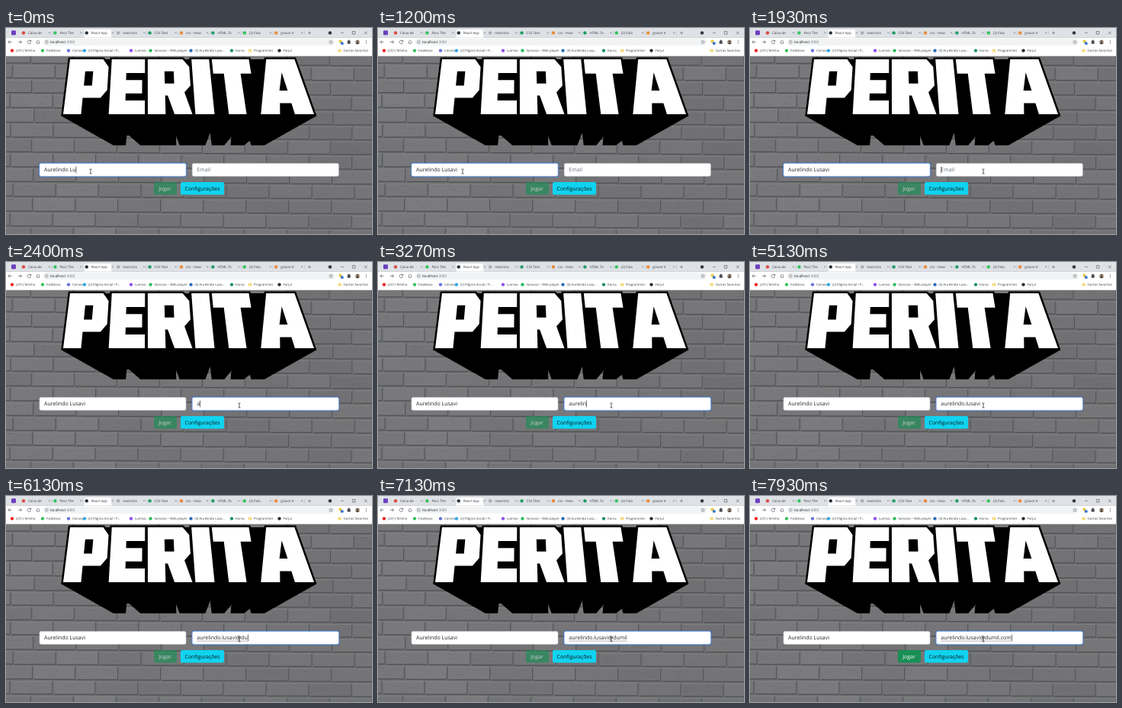
Recreate the animation shown at these times as an HTML page with a canvas. Size 480 px wide and 270 px high, loop 8 s.

```html
<!DOCTYPE html>
<html lang="pt-BR">
<head>
<meta charset="utf-8">
<title>Quiz</title>
<style>
  html, body { margin: 0; width: 100%; height: 100%; overflow: hidden; background: #757678; }
  canvas, svg { position: absolute; left: 0; top: 0; width: 480px; height: 270px; }
  text { font-family: "Open Sans", "Noto Sans", sans-serif; text-rendering: geometricPrecision; white-space: pre; }
</style>
</head>
<body>
<canvas id="wall" width="480" height="270"></canvas>
<svg id="stage" viewBox="0 0 480 270"></svg>
<script>
const LOOP = 8000;
const stage = document.getElementById('stage');

function add(tag, attrs, parent = stage) {
  const el = document.createElementNS('http://www.w3.org/2000/svg', tag);
  for (const k in attrs) el.setAttribute(k, attrs[k]);
  parent.append(el);
  return el;
}
const box = (x, y, width, height, fill, rx = 0, parent) =>
  add('rect', { x, y, width, height, fill, rx }, parent);
const dot = (cx, cy, r, fill) => add('circle', { cx, cy, r, fill });
const line = (d, stroke, width = 0.6, parent) =>
  add('path', { d, stroke, 'stroke-width': width, fill: 'none' }, parent);
function label(x, y, str, size, fill = '#3c4043', parent) {
  const el = add('text', { x, y, 'font-size': size, fill }, parent);
  el.textContent = str;
  return el;
}
const clamp = v => Math.max(0, Math.min(1, v));
const ramp = (t, start, ms) => clamp((t - start) / ms);

function drawWall() {
  const c = document.getElementById('wall').getContext('2d');
  let seed = 11;
  const rnd = () => (seed = seed * 16807 % 2147483647) / 2147483647;
  const fill = (color, x, y, w, h) => { c.fillStyle = color; c.fillRect(x, y, w, h); };
  fill('#707173', 0, 0, 480, 270);
  const rowH = 19.4, brickW = 56;
  for (let r = 0; r < 14; r++) {
    const shift = (r % 2) * brickW / 2 + rnd() * 6;
    for (let i = -1; i < 10; i++) {
      const x = i * brickW + shift - 22;
      const y = 29 + r * rowH + x * 0.008;
      const w = brickW - 2.5, h = rowH - 3;
      const g = 116 + rnd() * 8 - x / 90;
      fill(`rgb(${g},${g},${g + 2})`, x, y, w, h);
      fill('rgba(150,151,153,.35)', x, y, w, 1);
      fill('rgba(58,58,60,.6)', x, y + h, w, 1.2);
      fill('rgba(58,58,60,.5)', x + w, y + 1, 1, h);
      for (let k = 0; k < 12; k++) {
        const tone = rnd() < 0.5 ? 'rgba(150,150,152,.1)' : 'rgba(70,70,72,.1)';
        fill(tone, x + rnd() * (w - 7), y + 1 + rnd() * (h - 3), 2 + rnd() * 5, 1);
      }
    }
  }
}

function drawTabs() {
  box(0, 0, 480, 12.5, '#dee1e6');
  box(7, 3.2, 6, 6, '#6d3fc0', 1);
  add('path', { d: 'M101 12.5Q103 12.5 103 10V4Q103 2 105 2H136Q138 2 138 4V10Q138 12.5 140 12.5Z', fill: '#fff' });
  const tabs = [
    ['Caixa de', '#d94b3f'], ['Pass The', '#31c45a'], ['React App', '#26323a'],
    ['reactstra', '#a9adb2'], ['CSS Text', '#1f9d62'], ['css - How', '#ec8b36'],
    ['HTML To', '#1f9d62'], ['(2) Fala', '#31c45a'], ['gravar tr', '#ec8b36']
  ];
  tabs.forEach(([name, color], i) => {
    const x = 23 + i * 41.4;
    dot(x, 6.4, 2.2, color);
    label(x + 6, 8, name, 4.5);
    line(`M${x + 33} 5.3l2 2m0-2l-2 2`, '#5f6368', 0.5);
    if (i !== 1 && i !== 2) line(`M${x + 37.3} 4v5`, '#a3a7ac', 0.4);
  });
  line('M396 6.4h4M398 4.4v4', '#5f6368');
  dot(425, 6.4, 2.2, '#33373b');
  line('M439 6.4h4M454.3 4.5h3.6v3.6h-3.6zM470 4.6l3.6 3.6m0-3.6l-3.6 3.6', '#333', 0.5);
}

function drawAddress() {
  box(0, 12.5, 480, 24.3, '#fff');
  line('M7.5 18.3H3M5 16.2L2.9 18.3L5 20.4', '#50555a', 0.7);
  line('M16 18.3h4.5M18.5 16.2l2.1 2.1l-2.1 2.1', '#50555a', 0.7);
  line('M32.6 17.4a2.3 2.3 0 1 0 .1 1.8M32.8 15.8v1.9h-1.9', '#50555a', 0.7);
  line('M39.8 18.2L42 16.2L44.2 18.2M40.5 17.8v2.6h3v-2.6', '#50555a', 0.6);
  box(48.5, 13.8, 383, 9.2, '#f1f3f4', 4.6);
  line('M55.4 18.3a2 2 0 1 0-4 0a2 2 0 1 0 4 0M53.4 18v1.4M53.4 17v.5', '#5f6368', 0.5);
  const url = label(58, 20, 'localhost', 4.8, '#202124');
  add('tspan', { fill: '#70757a' }, url).textContent = ':3000';
  line('M426 16l.7 1.6l1.7.1l-1.3 1.1l.4 1.7l-1.5-.9l-1.5.9l.4-1.7l-1.3-1.1l1.7-.1z', '#5f6368', 0.5);
  dot(438.5, 17.6, 2.2, '#e6c94a');
  box(439, 18.4, 3.6, 3.4, '#2f6fd0', 0.6);
  box(447.7, 16.8, 4, 4, '#4b4f54', 0.6);
  dot(449.7, 16.6, 1, '#4b4f54');
  dot(461, 18.4, 2.9, '#a89787');
  dot(461, 17.6, 1.1, '#4a3d36');
  add('path', { d: 'M459 20.3q2-2.4 4 0q-2 1.7-4 0z', fill: '#4a3d36' });
  [16.5, 18.4, 20.3].forEach(y => dot(472.3, y, 0.5, '#3c4043'));
}

function drawBookmarks() {
  const marks = [
    [8, '#ef2020', '(231) Telinha'], [48, '#31c45a', 'FalaNovo'],
    [82, '#6672dc', 'Conviva'], [103, '#30a6ea', '(2) Página Inicial / P...'],
    [164, '#9150ed', 'Lumivo'], [189.5, '#25bd5b', 'Sonvara – Web player'],
    [242.5, '#246bb3', '(3) Aurelindo Lusa...'], [296, '#1c8f67', 'Korva'],
    [320, '#f4dc85', 'Programmer', 1], [358.5, '#24292e', 'Forjul'],
    [437.5, '#f4dc85', 'Outros favoritos', 1]
  ];
  for (const [x, color, name, folder] of marks) {
    if (folder) box(x - 2.2, 27.7, 4.6, 3.8, color, 0.5);
    else dot(x, 29.6, 2.2, color);
    label(x + 5, 31.2, name, 4.3);
  }
  line('M0 36.7H480', '#d5d7da', 0.4);
}

// Block letters as outlines in a unit square: width, then one or more loops.
const letters = [
  [1, '0 0 .85 0 1 .14 1 .56 .85 .7 .42 .7 .42 1 0 1', '.42 .22 .62 .22 .62 .48 .42 .48'],
  [0.85, '0 0 1 0 1 .25 .45 .25 .45 .38 .92 .38 .92 .62 .45 .62 .45 .75 1 .75 1 1 0 1'],
  [1.05, '0 0 .85 0 1 .14 1 .48 .85 .6 1 1 .6 1 .46 .66 .4 .66 .4 1 0 1',
    '.4 .22 .62 .22 .62 .44 .4 .44'],
  [0.45, '0 0 1 0 1 1 0 1'],
  [0.95, '0 0 1 0 1 .26 .72 .26 .72 1 .28 1 .28 .26 0 .26'],
  [1.25, '.3 0 .88 0 1 1 .64 1 .62 .8 .4 .8 .36 1 0 1', '.44 .57 .6 .57 .56 .24']
];

const lettersTop = 41, lettersHeight = 72;
function place(u, v) {
  const left = 84 - 9 * v, right = 386 + 18 * v;
  return `${(left + (right - left) * u).toFixed(2)} ${(lettersTop + lettersHeight * v).toFixed(2)}`;
}

function titlePath() {
  const gap = 0.07;
  const total = letters.reduce((sum, l) => sum + l[0] + gap, -gap);
  let pen = 0, d = '';
  for (const [width, ...loops] of letters) {
    for (const loop of loops) {
      const n = loop.split(' ').map(Number), pts = [];
      for (let i = 0; i < n.length; i += 2) pts.push(place((pen + n[i] * width) / total, n[i + 1]));
      d += `M${pts.join('L')}Z`;
    }
    pen += width + gap;
  }
  return d;
}

function drawTitle() {
  const d = titlePath(), vx = 240, vy = 210, depth = 0.405, steps = 56;
  for (let i = steps; i >= 0; i--) {
    const k = 1 - depth * i / steps;
    add('path', {
      d, fill: '#000', 'fill-rule': 'evenodd', stroke: '#000', 'stroke-width': 5,
      transform: `translate(${vx * (1 - k)} ${vy * (1 - k)}) scale(${k})`
    });
  }
  add('path', { d: `M${place(0, 0)}L${place(0.97, 0)}L${place(1, 1)}L${place(0, 1)}Z` });
  add('path', { d, fill: '#fff', 'fill-rule': 'evenodd' });
}

function field(x) {
  const glow = box(x - 1.4, 176, 194.8, 19.8, 'rgb(13,110,253)', 3);
  const frame = box(x, 177.5, 192, 16.8, '#fff', 2);
  frame.setAttribute('stroke-width', 0.6);
  return { x: x + 6, glow, frame, text: label(x + 6, 188.4, '', 7, '#212529') };
}

function focusField(f, k) {
  f.glow.setAttribute('opacity', 0.28 * k);
  const mix = (a, b) => Math.round(a + (b - a) * k);
  f.frame.setAttribute('stroke', `rgb(${mix(206, 134)},${mix(212, 183)},${mix(218, 254)})`);
}

// Typing tables: time in ms, number of characters shown from then on.
const NAME = 'Aurelindo Lusavi', MAIL = 'aurelindo.lusavi@dumil.com';
const nameKeys = [[-70, 12], [130, 13], [270, 14], [400, 15], [600, 16]];
const mailKeys = [
  [1930, 0], [2400, 1], [2530, 2], [2730, 3], [3000, 6], [3200, 7], [3400, 8], [3530, 9],
  [3930, 10], [4070, 11], [4200, 12], [4330, 13], [4400, 14], [4470, 15], [4600, 16],
  [5470, 17], [5870, 18], [6000, 19], [6270, 20], [6400, 21], [6600, 22],
  [7270, 23], [7400, 24], [7530, 25], [7730, 26]
];
const FOCUS = 1930, READY = 7730, BLINK = 530;
const lastKey = (keys, t) => keys.filter(k => k[0] <= t).pop();

drawWall();
drawTabs();
drawAddress();
drawBookmarks();
drawTitle();

const nameField = field(44), mailField = field(244.3);
const play = add('g', {});
box(194, 202, 30, 16.4, '#198f55', 2, play);
label(200.2, 212.6, 'Jogar', 7, '#fff', play);
box(229, 202, 57, 16.4, '#10d3f0', 2);
label(234.6, 212.6, 'Configurações', 6.9, '#101416');
const underline = line('', '#666', 0.5);
const caret = box(0, 181.5, 0.6, 8.8, '#111');
const mouse = add('g', {});
line('M-1.5-3H-.4L0-2.6L.4-3H1.5M0-2.6V2.6M-1.5 3H-.4L0 2.6L.4 3H1.5', '#111', 0.7, mouse);

function render(t) {
  const onMail = t >= FOCUS;
  const shift = ramp(t, FOCUS, 150);
  focusField(nameField, 1 - shift);
  focusField(mailField, shift);

  const nameKey = lastKey(nameKeys, t), mailKey = lastKey(mailKeys, t);
  const mail = mailKey ? MAIL.slice(0, mailKey[1]) : '';
  nameField.text.textContent = NAME.slice(0, nameKey[1]);
  mailField.text.textContent = mail || 'Email';
  mailField.text.setAttribute('fill', mail ? '#212529' : '#6c757d');

  const active = onMail ? mailField : nameField;
  const key = onMail ? mailKey : nameKey;
  const width = key[1] ? active.text.getComputedTextLength() : 0;
  caret.setAttribute('x', active.x + width + 0.2);
  caret.setAttribute('opacity', Math.floor((t - key[0]) / BLINK) % 2 ? 0 : 1);
  underline.setAttribute('d', mail.includes('@') ? `M${mailField.x} 190.1h${width}` : '');

  const go = ramp(t, 1270, 530), ease = go * go * (3 - 2 * go);
  mouse.setAttribute('transform', `translate(${111 + 195 * ease} ${188 + 2 * Math.sin(Math.PI * ease)})`);
  play.setAttribute('opacity', 0.65 + 0.35 * ramp(t, READY, 150));
}

const start = performance.now();
function tick() {
  render((performance.now() - start) % LOOP);
  requestAnimationFrame(tick);
}
tick();
</script>
</body>
</html>
```
